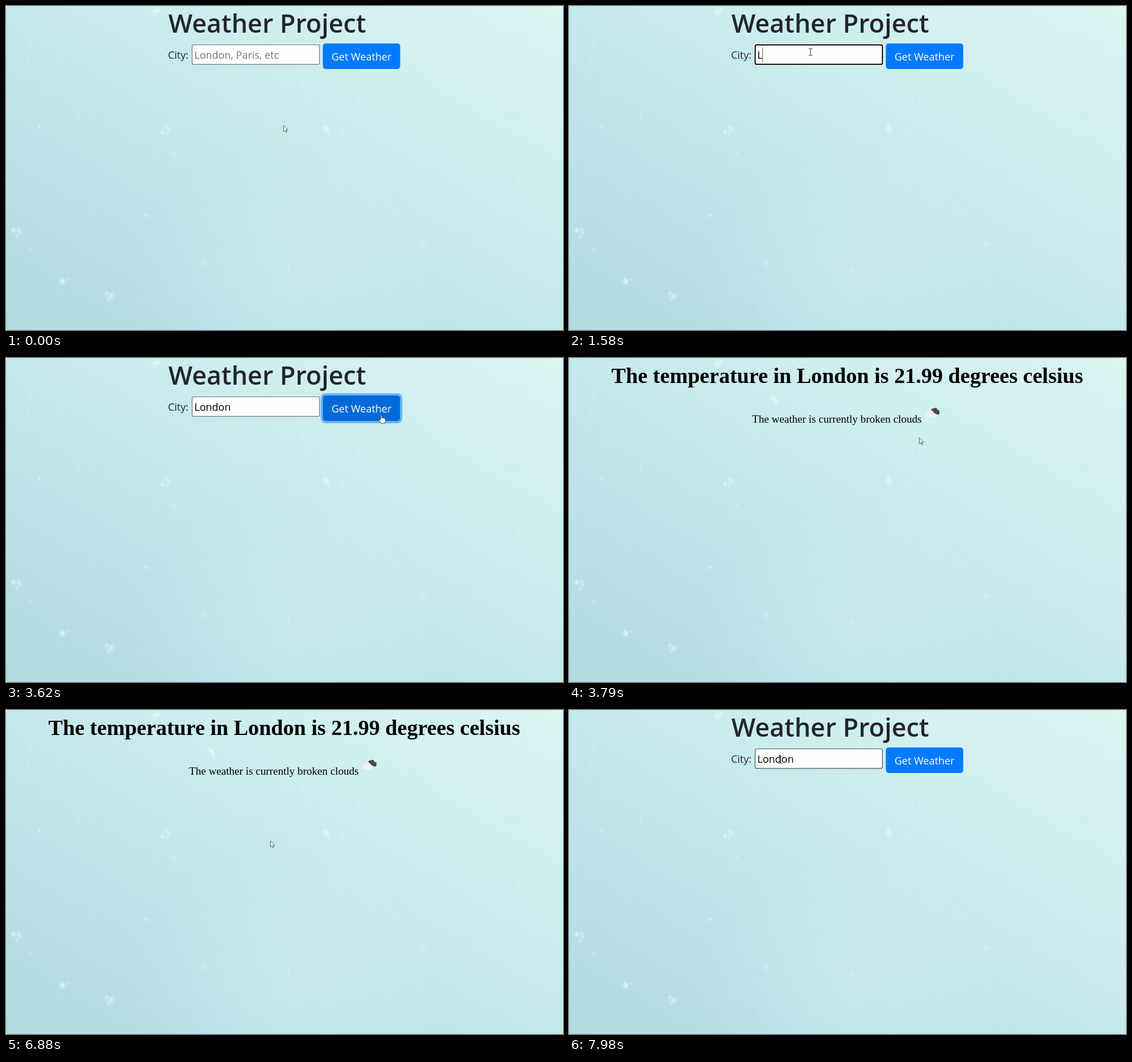
Animation of 980x571 px, one loop 8000 ms. Source, as an HTML page with a canvas:

```html
<!DOCTYPE html>
<html lang="en">
<head>
<meta charset="utf-8">
<title>Weather Project</title>
<style>
  html, body { margin: 0; width: 100%; height: 100%; overflow: hidden; background: #c3e7eb; }
  canvas, svg { position: absolute; left: 0; top: 0; display: block; }
  text { white-space: pre; }
  #form text { font: 18px "Open Sans", "Noto Sans", sans-serif; fill: #212529; }
  #form .title { font-size: 44.8px; font-weight: 600; }
  #form .label { fill: #fff; text-anchor: middle; }
  #form #hint { fill: #757575; }
  #form #typed { fill: #000; }
  #report text { font: 19.1px "Liberation Serif", "Times New Roman", serif; }
  #report .title { font-size: 38.1px; font-weight: 700; text-anchor: middle; }
  .pointer { fill: #fff; stroke: #333; stroke-width: .8; stroke-linejoin: round; }
</style>
</head>
<body>
<canvas id="sky" width="980" height="571"></canvas>
<svg width="980" height="571" viewBox="0 0 980 571">
  <g id="form">
    <text class="title" x="285.8" y="47">Weather Project</text>
    <text x="284.9" y="93">City:</text>
    <rect id="halo" x="325.8" y="66.8" width="227.4" height="37.4" rx="4" fill="none" stroke="#fff" stroke-width="1.6"/>
    <rect id="field" x="327.5" y="68.5" width="224" height="34.3" rx="2.5" fill="#fdfefe"/>
    <text id="hint" x="331.3" y="93">London, Paris, etc</text>
    <text id="typed" x="331.3" y="93"></text>
    <rect id="caret" y="73" width="1" height="26" fill="#666"/>
    <rect id="ring" x="555.6" y="64.2" width="139.8" height="48.8" rx="6.5" fill="none" stroke="#007bff" stroke-width="3.8"/>
    <rect id="button" x="557.5" y="66" width="136" height="45" rx="5"/>
    <text class="label" x="625.5" y="96">Get Weather</text>
  </g>
  <g id="report">
    <text class="title" x="489.6" y="44">The temperature in London is 21.99 degrees celsius</text>
    <text x="322" y="114">The weather is currently broken clouds</text>
    <path fill="#484849" d="M638 93a3 3 0 0 1 4-4a3.400 3.400 0 0 1 6 2.600a3 3 0 0 1 3.600 4.200a2.800 2.800 0 0 1-3.400 3.800l-5-1.600z"/>
    <path fill="#f2f0f0" d="M630 104.300a3.400 3.400 0 0 1-.5-6.800a3 3 0 0 1 3.500-2.500a4.800 4.800 0 0 1 8.800 1.500a3.600 3.600 0 0 1 3 3.200a2.400 2.400 0 0 1-.6 4.600z"/>
  </g>
  <g id="cursor">
    <path id="arrow" class="pointer" d="M.4 .6V11.400L2.900 9.100L4.600 12.900L6.300 12.200L4.700 8.500H8z"/>
    <path id="beam" fill="none" stroke="#333" d="M-3.500 -6H-1Q0 -6 0 -5Q0 -6 1 -6H3.500M0 -5V5M-3.500 6H-1Q0 6 0 5Q0 6 1 6H3.500"/>
    <path id="hand" class="pointer" d="M-.9 8.500V.8Q-.9 -.3 .1 -.3T1.200 .8V4.500Q2.900 3.700 3.400 5Q5 4.400 5.500 5.700Q7.300 5.300 7.500 7V10.300L6.200 14.500H.3L-3.500 9.200Q-3.700 7.500-2.200 7.700z"/>
  </g>
</svg>
<script>
const LOOP = 8000, STEP = 50;
const FOCUS = 910, TYPE = 1580, KEY_GAP = 174, CLICK = 3270, LEAVE = 3770, BACK = 7280;
const WORD = 'London';

const $ = id => document.getElementById(id);
const clamp = v => Math.max(0, Math.min(1, v));
const show = (id, on) => { $(id).style.display = on ? '' : 'none'; };
const within = (v, a, b) => v >= a && v < b;

function paintSky() {
  const g = $('sky').getContext('2d');
  let seed = 41;
  const rnd = () => (seed = seed * 16807 % 2147483647) / 2147483647;

  function glow(x, y, rx, ry, rgb, alpha) {
    const soft = g.createRadialGradient(0, 0, 0, 0, 0, 1);
    soft.addColorStop(0, `rgba(${rgb},${alpha})`);
    soft.addColorStop(.45, `rgba(${rgb},${alpha * .6})`);
    soft.addColorStop(1, `rgba(${rgb},0)`);
    g.save();
    g.translate(x, y);
    g.scale(rx, ry);
    g.fillStyle = soft;
    g.fillRect(-1, -1, 2, 2);
    g.restore();
  }

  function fleck(x, y, r, alpha) {
    for (let i = 0; i < 5; i++) {
      const s = r * (.3 + rnd() * .3);
      glow(x + (rnd() - .5) * r * 1.3, y + (rnd() - .5) * r * 1.5, s, s * 1.2, '240,254,254', alpha);
    }
  }

  const base = g.createLinearGradient(0, 571, 497, -282);
  base.addColorStop(0, '#b0dae1');
  base.addColorStop(.5, '#c5e8eb');
  base.addColorStop(1, '#dbf6f3');
  g.fillStyle = base;
  g.fillRect(0, 0, 980, 571);
  glow(500, 490, 270, 240, '222,248,248', .25);

  // faint vertical grain
  for (let i = 0; i < 900; i++) {
    const rgb = i % 2 ? '235,252,252' : '150,205,214';
    glow(rnd() * 980, rnd() * 571, 2 + rnd() * 5, 5 + rnd() * 12, rgb, .02 + rnd() * .04);
  }

  // the clear snow flecks, then a scatter of dim ones towards the left
  const clear = [[262, 11], [280, 218], [566, 218], [18, 400], [104, 489], [180, 512], [361, 75]];
  for (const [x, y] of clear) fleck(x, y, 10, .42);
  for (let i = 0; i < 12; i++) fleck(rnd() ** 2 * 980, rnd() * 571, 6, .22);
}

// pointer moves: start, end, target x y, bend x y
const START = [488, 210];
const moves = [
  [360, 860, 425, 81, 700, 60],
  [2810, 3110, 660, 101, 490, 84],
  [3670, 4030, 516, 216, 610, 150],
  [4350, 4550, 483, 228, 500, 222],
  [5410, 5510, 467, 231, 475, 230],
  [6880, 7640, 376, 108, 452, 226],
  [7830, 7980, 372, 88, 374, 98]
];

function pointerAt(t) {
  let [x, y] = START;
  for (const [from, to, tx, ty, bx, by] of moves) {
    if (t < from) break;
    const steps = Math.round((to - from) / STEP) + 1;
    const k = clamp((Math.floor((t - from) / STEP) + 1) / steps);
    const curve = (a, b, c) => (1 - k) ** 2 * a + 2 * k * (1 - k) * b + k * k * c;
    x = curve(x, bx, tx);
    y = curve(y, by, ty);
  }
  return [Math.round(x), Math.round(y)];
}

function drawForm(t, overField) {
  const count = Math.max(0, Math.min(WORD.length, Math.floor((t - TYPE) / KEY_GAP) + 1));
  const text = WORD.slice(0, count);
  const typed = $('typed');
  if (typed.textContent !== text) typed.textContent = text;
  show('hint', !count);

  const focused = within(t, FOCUS, CLICK);
  show('halo', focused);
  $('field').setAttribute('stroke', focused ? '#000' : overField ? '#4f4f4f' : '#767676');
  $('field').setAttribute('stroke-width', focused ? 2 : 1.2);

  const since = t - (count ? TYPE + (count - 1) * KEY_GAP : FOCUS);
  show('caret', focused && since % 1000 < 515);
  $('caret').setAttribute('x', Math.floor(331.3 + (count ? typed.getComputedTextLength() : 0)));

  const fade = (a, b) => clamp((t - a) / 150) - clamp((t - b) / 150);
  const hover = fade(590, 690) + fade(2990, LEAVE);
  const press = fade(CLICK, CLICK + 120);
  const green = Math.round(123 - 18 * hover - 7 * press);
  const blue = Math.round(255 - 38 * hover - 13 * press);
  $('button').setAttribute('fill', `rgb(0,${green},${blue})`);
  $('ring').setAttribute('opacity', .5 * fade(CLICK, LEAVE));
}

function draw(t) {
  const [x, y] = pointerAt(t);
  const onForm = !within(t, LEAVE, BACK);
  const overField = onForm && within(x, 327, 552) && within(y, 68, 103);
  const overButton = onForm && within(x, 557, 694) && within(y, 66, 111);

  show('form', onForm);
  show('report', !onForm);
  if (onForm) drawForm(t, overField);

  $('cursor').setAttribute('transform', `translate(${x} ${y})`);
  show('beam', overField);
  show('hand', overButton);
  show('arrow', !overField && !overButton);
}

paintSky();
const start = performance.now();
function frame() {
  draw((performance.now() - start) % LOOP);
  requestAnimationFrame(frame);
}
frame();
</script>
</body>
</html>
```
